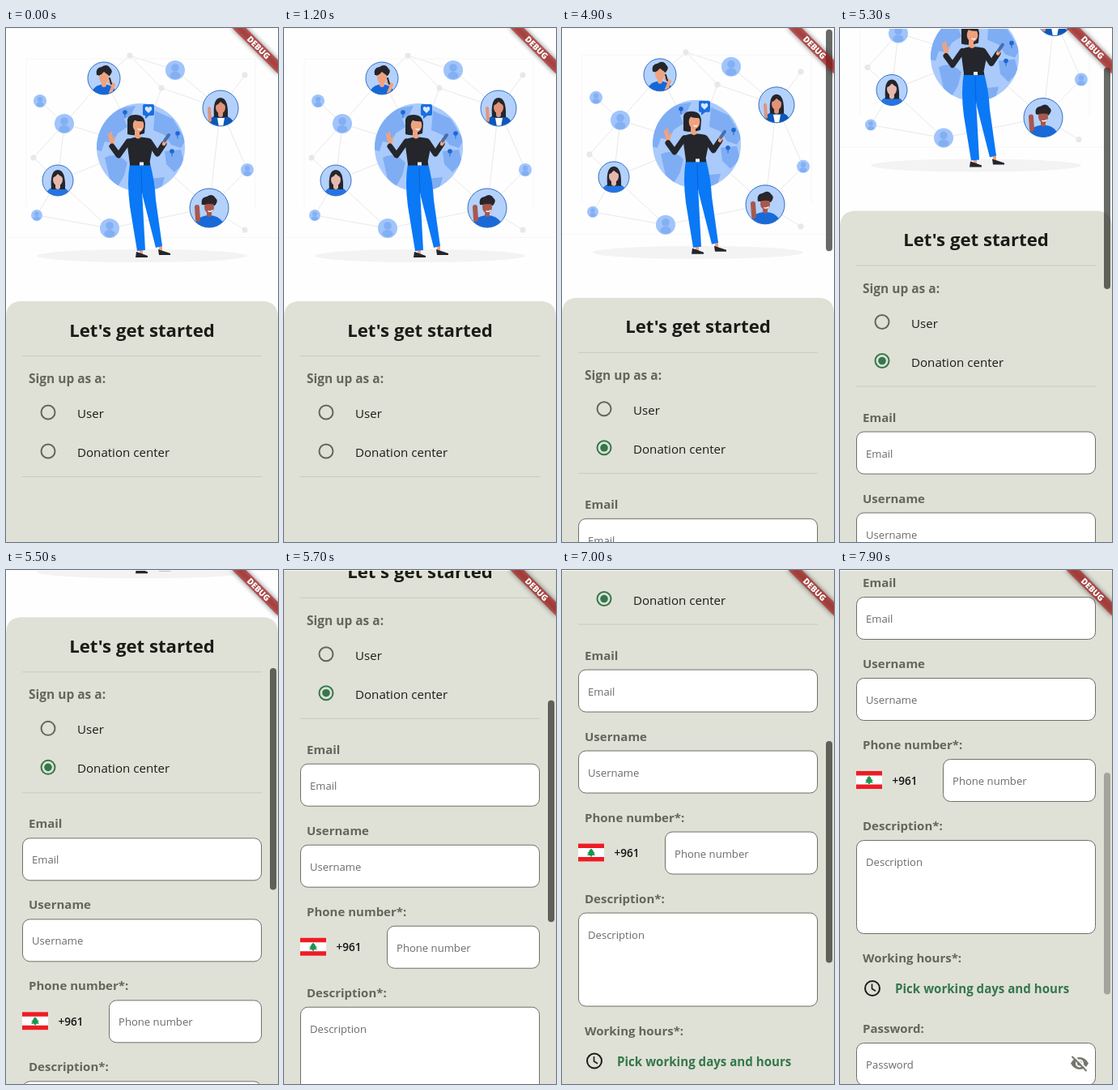
An HTML page that plays this animation: 336 px wide and 634 px high, repeating every 8 s.

```html
<!DOCTYPE html>
<html lang="en">
<head>
<meta charset="utf-8">
<title>Sign up</title>
<style>
  html, body { margin: 0; width: 100%; height: 100%; overflow: hidden; background: #fefefe; }
  svg { display: block; width: 336px; height: 634px; font-family: "Open Sans", "Noto Sans", sans-serif; }
  .title { font-size: 22.2px; font-weight: 700; fill: #1a1c17; text-anchor: middle; }
  .label { font-size: 15px; font-weight: 700; fill: #63665b; }
  .option { font-size: 15.1px; fill: #1a1c17; }
  .hint { font-size: 13.1px; fill: #6b6b6b; }
  .code { font-size: 13.6px; font-weight: 600; fill: #141414; }
  .link { font-size: 15.1px; font-weight: 700; fill: #35774c; }
  .rule { stroke: #c8cabf; }
  .field { fill: #fff; stroke: #6d7066; }
  .net { fill: none; stroke: #e9e9e9; }
  .limb { fill: none; stroke-linecap: round; stroke-linejoin: round; }
</style>
</head>
<body>
<svg id="stage" viewBox="0 0 336 634"></svg>
<script>
const text = (cls, x, y, s) => `<text class="${cls}" x="${x}" y="${y}">${s}</text>`;
const dot = (x, y, r, fill, more = '') => `<circle cx="${x}" cy="${y}" r="${r}" fill="${fill}" ${more}/>`;
const path = (d, fill, more = '') => `<path d="${d}" fill="${fill}" ${more}/>`;
const limb = (d, color, width) => `<path class="limb" d="${d}" stroke="${color}" stroke-width="${width}"/>`;
const rule = y => `<path class="rule" d="M20 ${y}H316"/>`;
const box = (y, h = 52, x = 20) =>
  `<rect class="field" x="${x + .5}" y="${y}" width="${315 - x}" height="${h}" rx="9"/>`;
const field = (y, label, hint, h, x = 20) =>
  text('label', 28, y - 12.5, label) + box(y, h, x) + text('hint', x + 12, y + 31.5, hint);

const BLUE = '#0b78f6', INK = '#24262b', SKIN = '#f0a27f';

// Small faded figure in a bubble
const bubble = (x, y, r) => dot(x, y, r, '#a0c4fb') +
  `<g fill="#83aff3">${dot(x, y - r * .25, r * .4, '#83aff3')}
  <ellipse cx="${x}" cy="${y + r * .55}" rx="${r * .55}" ry="${r * .38}"/></g>`;

// Portrait clipped to a round frame
const portrait = (id, x, y, r, skin, shirt, hair, extra) => `
  <clipPath id="${id}"><circle r="${r}"/></clipPath>
  <g transform="translate(${x} ${y})">
    ${dot(0, 0, r, '#b4d1fb')}
    <g clip-path="url(#${id})">
      <ellipse cx="0" cy="${r}" rx="${r * .78}" ry="${r * .62}" fill="${shirt}"/>
      ${hair}
      <rect x="-3" y="2" width="6" height="9" rx="3" fill="${skin}"/>
      <ellipse cx="0" cy="-1" rx="6" ry="7.5" fill="${skin}"/>
      ${extra}
    </g>
    ${dot(0, 0, r, 'none', 'stroke="#2f6fc4" stroke-width="1"')}
  </g>`;

const network = `
  <path class="net" d="M153 34L121 62 72 118 64 188 128 247 251 222 265 99 209 52 153 34 192 74 265 99 295 58
    M42 90L72 118 34 160 64 188 38 231 128 247M121 62L166 147 192 74M72 118L166 147 64 188M298 175L251 222 295 249M265 99L298 175M166 147L251 222"/>
  <path class="net" style="stroke:#f6f6f6" d="M0 258.5H336M25 220V38H308V220"/>` +
  [[153, 34], [192, 74], [295, 58], [34, 160], [295, 249]].map(([x, y]) => dot(x, y, 3.6, '#e7e8ea')).join('') +
  [[209, 52, 12], [42, 90, 8], [72, 118, 12], [298, 175, 8], [38, 231, 7], [128, 247, 12]].map(b => bubble(...b)).join('');

const globe = dot(166.5, 147.5, 54.5, '#a9caFB') + `
  <clipPath id="earth"><circle cx="166.5" cy="147.5" r="54.5"/></clipPath>
  <g clip-path="url(#earth)" fill="#7fadf4">
    <path d="M112 128Q122 104 146 98L160 96 154 108 146 112 150 122 138 130 132 142 122 140 118 152 110 150Z"/>
    <path d="M122 160Q136 152 150 166L146 182 138 196 128 186Z"/>
    <path d="M184 102L206 112 222 138 216 148 204 144 196 132 182 126Z"/>
    <path d="M196 152L216 150 220 166 208 178 198 168Z"/>
    <path d="M176 186L196 184 192 198 178 202Z"/>
  </g>` +
  [[147, 104], [205, 152], [212, 130]].map(([x, y]) => dot(x, y, 2.8, '#1d68d3') + limb(`M${x} ${y}v6`, '#1d68d3', 1)).join('') +
  path('M171 94H181Q183 94 183 96V106Q183 108 181 108H177L172 112V108H171Q169 108 169 106V96Q169 94 171 94Z', '#1a6ee0') +
  path('M176 105L172 101Q171 97 174 97 176 97 176 99 176 97 178 97 181 97 180 101Z', '#d9e8ff');

const woman =
  path('M150 116Q149 107 160 107 171 107 172 118L171 130Q160 134 150 131Z', INK) +
  limb('M162 128V137', SKIN, 6) +
  `<ellipse cx="163.5" cy="120" rx="6.8" ry="8.6" fill="${SKIN}"/>` +
  path('M155 122Q153 108 164 109 171 111 171 115 162 116 158 113Z', INK) +
  limb('M163 124.500q2 1.500 4 0', '#fff', 1.2) +
  limb('M131 147L127 131M131 146L130 129M131 146L134 135', SKIN, 2.6) +
  limb('M151 140L139 157 131 146', INK, 7) +
  limb('M177 140L187 155 195 143', INK, 7) +
  limb('M195 143L198 137', SKIN, 4.5) +
  limb('M196 139L201 132', '#456fae', 4) +
  path('M149 138Q160 132 177 136L182 143 177 168H153Z', INK) +
  path('M158 133Q163 140 168 133Z', SKIN) +
  limb('M167 272V279M191 268V276', SKIN, 4) +
  path('M153 167H178Q184 190 185 212L193 269 185 271 169 208 168 200 172 274 162 275 153 220Q149 190 153 167Z', BLUE) +
  limb('M167 172L168 204', '#0862cf', 1) +
  path('M153 165.500H178V169.500H153Z', INK) +
  `<rect x="165" y="165.500" width="5" height="4" fill="#f3f3f3"/>` +
  path('M161 276L167 278 175 281V283H160Z', INK) +
  path('M188 273L194 275 203 278V280H189Z', INK);

const hairShort = path('M-9-4Q-11-13-3-14 4-19 8-12 12-9 7-3Z', INK);
const hairLong = path('M-8 11Q-10-13 0-13 10-13 9 11Z', INK);
const fringe = path('M-7-3Q-6-11 1-11 7-10 7-3 2-6 0-8-3-4-7-3Z', INK);

const people =
  portrait('caller', 121, 62, 20, SKIN, '#1667d9', hairShort, fringe + limb('M8 18L12 8 7 5', SKIN, 4) + limb('M7 0L9 7', INK, 2)) +
  portrait('waver', 265, 99, 22, '#e29379', '#0d57b7', hairLong, fringe + path('M-4 12H5L3 23H-2Z', '#fff') + limb('M-13 15L-14 0', '#e29379', 4)) +
  portrait('reader', 64, 188, 19, '#e6b8ad', '#2474e4', hairLong, fringe) +
  portrait('cheerer', 251, 222, 24, '#a8584d', '#1969d9', hairShort,
    path('M-7-4Q-5-11 1-10 7-11 7-4 2-6-7-4Z', '#332427') + limb('M-14 14L-15-1', '#a8584d', 6) + limb('M-1 4q3 1 5-1', '#fff', 1.4));

const radio = (id, y) => `
  <circle id="${id}Hover" cx="52" cy="${y}" r="20" fill="#1a1c17"/>
  <circle id="${id}Ring" cx="52" cy="${y}" r="8.500" fill="none" stroke="#63665b" stroke-width="2"/>`;

const flag = `
  <rect x="20" y="824" width="32" height="22" fill="#fff"/>
  <path d="M20 824h32v5.500h-32zM20 840.500h32v5.500h-32z" fill="#ee1c25"/>
  <path d="M36 830l3 3h-1l3 3h-2l2 2.500h-4v1.500h-2v-1.500h-4l2-2.500h-2l3-3h-1z" fill="#199650"/>`;

const eyeOff = `
  <g transform="translate(296 1184.500)" fill="none">
    ${path('M-11 0Q-7-7.500 0-7.500T11 0Q7 7.500 0 7.500T-11 0Z', '#74766f')}
    ${dot(0, 0, 4, '#74766f', 'stroke="#fff" stroke-width="2"')}
    <path d="M-8-10L10 8" stroke="#fff" stroke-width="2"/>
    <path d="M-9.500-8.500L8.500 9.500" stroke="#74766f" stroke-width="2"/>
  </g>`;

const form = `
  ${field(609.5, 'Email', 'Email')}
  ${field(709.5, 'Username', 'Username')}
  ${field(809.5, 'Phone number*:', 'Phone number', 52, 127)}
  ${flag}${text('code', 64.5, 840.5, '+961')}
  ${field(909.5, 'Description*:', 'Description', 115)}
  ${text('label', 28, 1060, 'Working hours*:')}
  ${dot(40, 1092, 9, 'none', 'stroke="#1a1c17" stroke-width="2"')}
  ${limb('M39.500 1087V1092.500L43.500 1095', '#1a1c17', 1.6)}
  ${text('link', 68, 1098, 'Pick working days and hours')}
  ${field(1159.5, 'Password:', 'Password')}
  ${eyeOff}`;

const $ = id => document.getElementById(id);
$('stage').innerHTML = `
  <defs><filter id="blur" x="-20%" y="-100%" width="140%" height="300%"><feGaussianBlur stdDeviation="3"/></filter></defs>
  <rect width="336" height="634" fill="#fefefe"/>
  <g id="page">
    ${network}
    <ellipse cx="168" cy="281" rx="130" ry="8" fill="#f3f3f3"/>
    ${globe}${people}${woman}
    <path d="M0 1480V357Q0 337 20 337H316Q336 337 336 357V1480Z" fill="#dfe1d6"/>
    ${text('title', 168, 380.5, "Let's get started")}
    ${rule(404.5)}
    <text class="label" x="28" y="438" style="font-size:15.500px">Sign up as a:</text>
    ${radio('user', 474)}${text('option', 88, 481, 'User')}
    ${radio('center', 522)}${text('option', 88, 529, 'Donation center')}
    <circle id="centerDot" cx="52" cy="522" fill="#35774c"/>
    ${rule(553.5)}
    <g id="form">${form}</g>
  </g>
  <rect id="thumb" x="326" width="8" height="273.500" rx="4" fill="#1a1c17"/>
  <rect width="336" height="1" fill="#f8f9f6"/>
  <g transform="translate(336 0) rotate(45)">
    <rect x="-40" y="28" width="80" height="12" fill="#000" opacity=".5" filter="url(#blur)"/>
    <rect x="-40" y="28" width="80" height="12" fill="#b71c1c" opacity=".627"/>
    <text y="37.700" text-anchor="middle" font-size="10.200" font-weight="800" fill="#fff">DEBUG</text>
  </g>`;

const ramp = (t, from, to) => Math.min(1, Math.max(0, (t - from) / (to - from)));
const smooth = p => p * p * (3 - 2 * p);
const set = (id, name, value) => $(id).setAttribute(name, value);

function scrollAt(t) {
  const drag = t < 4600 ? 0 : t > 6300 ? 396 : 396 / (1 + Math.exp((5405 - t) / 111));
  return drag + 180 * smooth(ramp(t, 6700, 7300));
}

function draw() {
  const t = performance.now() % 8000;
  const scroll = scrollAt(t);
  const picked = t >= 3800;
  set('page', 'transform', `translate(0 ${-scroll})`);
  set('userHover', 'opacity', .13 * (ramp(t, 1850, 1950) - ramp(t, 2800, 2900)));
  set('centerHover', 'opacity', .13 * (ramp(t, 3450, 3500) - ramp(t, 3900, 4000)));
  set('centerRing', 'stroke', picked ? '#35774c' : t >= 3500 ? '#4c4e46' : '#63665b');
  set('centerDot', 'r', 4.8 * ramp(t, 3780, 3980));
  set('form', 'visibility', picked ? 'visible' : 'hidden');
  set('thumb', 'y', scroll * .434);
  set('thumb', 'opacity', .65 * ramp(t, 4550, 4700) - .08 * ramp(t, 7400, 7600) - .27 * ramp(t, 7700, 7900));
  requestAnimationFrame(draw);
}
draw();
</script>
</body>
</html>
```
